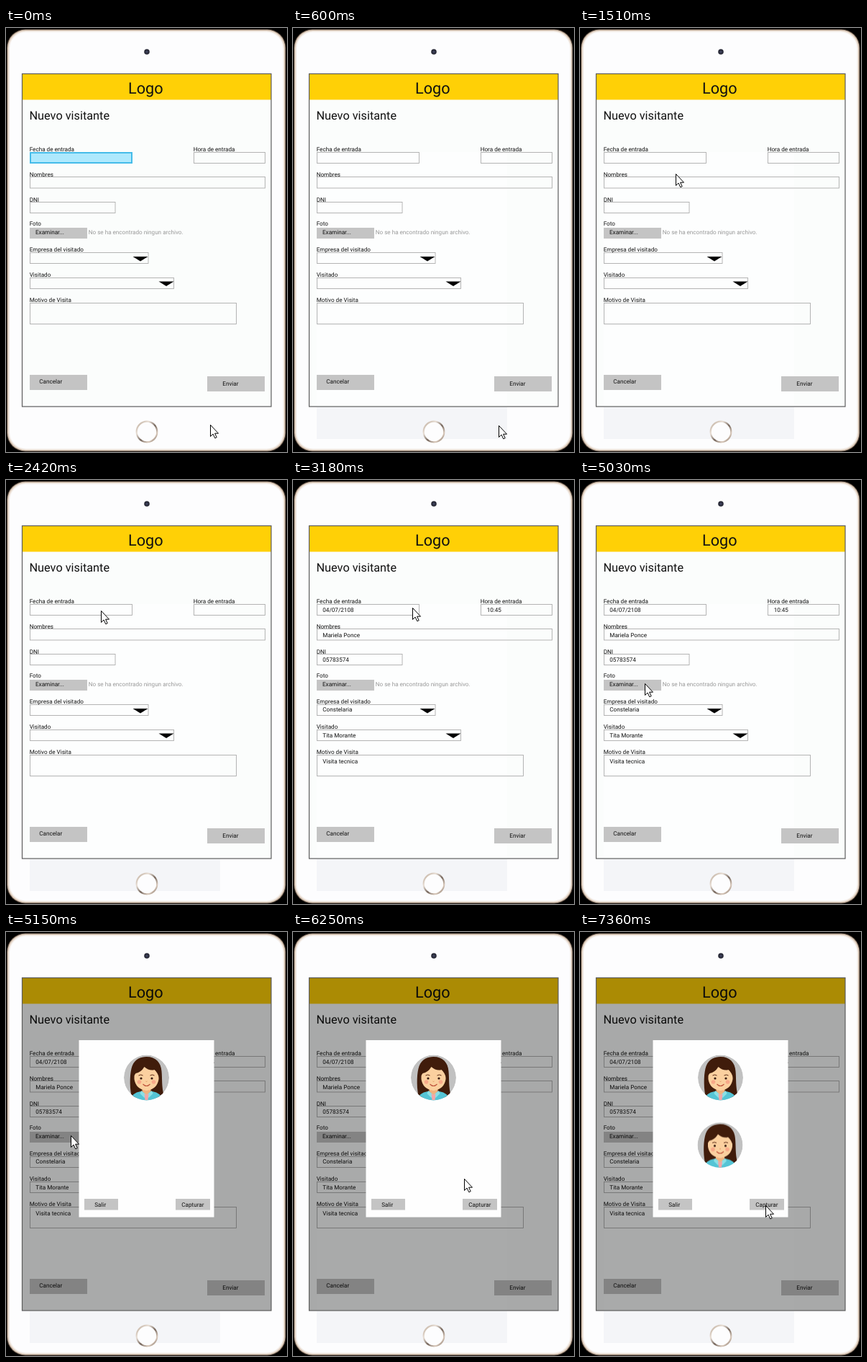
An HTML page that plays this animation: 391x588 px, repeating every 8000 ms.

```html
<!DOCTYPE html>
<html lang="es">
<head>
<meta charset="utf-8">
<title>Nuevo visitante</title>
<style>
  html, body { margin: 0; width: 100%; height: 100%; overflow: hidden; background: #000; }
  svg { display: block; width: 391px; height: 588px; }
  text { font: 8.13px Roboto, sans-serif; fill: #111; text-rendering: geometricPrecision; }
  .logo { font-size: 21.7px; }
  .title { font-size: 16.3px; }
  .hint { fill: #999; }
  .box { fill: none; stroke: #adadad; stroke-width: .9; }
  .button { fill: #c4c4c4; }

  .focus, .trace, .values, .modal, .capture, .cursor { animation: 8s step-end infinite; }
  .focus { animation-name: focus; }
  .trace { animation-name: trace; }
  .values { animation-name: values; }
  .modal { animation-name: modal; }
  .capture { animation-name: capture; }
  .cursor { animation-name: cursor; }

  @keyframes focus {
    0% { opacity: 1; }
    1.5% { opacity: .8; }
    3% { opacity: .6; }
    4.5% { opacity: .4; }
    6% { opacity: .2; }
    7.5%, 100% { opacity: 0; }
  }
  @keyframes trace { 0% { opacity: 0; } 1.5%, 100% { opacity: 1; } }
  @keyframes values { 0% { opacity: 0; } 31.75%, 100% { opacity: 1; } }
  @keyframes modal { 0% { opacity: 0; } 64.375%, 100% { opacity: 1; } }
  @keyframes capture { 0% { opacity: 0; } 92%, 100% { opacity: 1; } }
  @keyframes cursor {
    0% { transform: translate(284px, 550px); }
    1.5% { transform: translate(286px, 551px); }
    10.625% { transform: translate(215px, 390px); }
    12.125% { transform: translate(155px, 264px); }
    15.625% { transform: translate(140px, 222px); }
    17.375% { transform: translate(136px, 210px); }
    18.875% { transform: translate(133px, 202px); }
    20.375% { transform: translate(131px, 195px); }
    22.25% { transform: translate(125px, 187px); }
    23.75% { transform: translate(127px, 183px); }
    25.25% { transform: translate(132px, 181px); }
    35.25% { transform: translate(138px, 180px); }
    36.75% { transform: translate(147px, 179px); }
    38.25% { transform: translate(158px, 178px); }
    39.75% { transform: translate(166px, 177px); }
    41.625% { transform: translate(195px, 228px); }
    43.125% { transform: translate(248px, 335px); }
    44.625% { transform: translate(274px, 393px); }
    49.625% { transform: translate(274px, 404px); }
    51.125% { transform: translate(276px, 411px); }
    52.625% { transform: translate(223px, 388px); }
    54.5% { transform: translate(190px, 360px); }
    56% { transform: translate(145px, 322px); }
    57.5% { transform: translate(102px, 293px); }
    59% { transform: translate(82px, 288px); }
    61% { transform: translate(90px, 282px); }
    67.625% { transform: translate(100px, 283px); }
    69.125% { transform: translate(122px, 288px); }
    70.625% { transform: translate(148px, 296px); }
    72.125% { transform: translate(174px, 305px); }
    73.625% { transform: translate(198px, 314px); }
    75.125% { transform: translate(218px, 321px); }
    76.625% { transform: translate(231px, 326px); }
    78.125% { transform: translate(238px, 342px); }
    79.625% { transform: translate(247px, 360px); }
    81.125% { transform: translate(254px, 375px); }
    82.625% { transform: translate(258px, 384px); }
    92%, 100% { transform: translate(258px, 379px); }
  }
</style>
</head>
<body>
<svg viewBox="0 0 391 588">
  <defs>
    <linearGradient id="ring" x1="0" y1="0" x2="1" y2="1">
      <stop offset="0" stop-color="#b9a796"/>
      <stop offset=".3" stop-color="#e9dfd6"/>
      <stop offset=".55" stop-color="#75665c"/>
      <stop offset=".78" stop-color="#d9c9bb"/>
      <stop offset="1" stop-color="#806f63"/>
    </linearGradient>
    <clipPath id="disc"><circle r="31.5"/></clipPath>
    <g id="avatar" clip-path="url(#disc)">
      <circle r="31.5" fill="#c1c1c1"/>
      <path d="M-21 25C-24 10-23-8-20-16C-16-26-8-29 0-29C13-29 20-21 21-9C22 2 21 12 24 24Q14 30 0 28Q-14 30-21 25Z" fill="#401c0b"/>
      <path d="M-24 33Q-21 21-8 19L0 23L8 19Q21 21 24 33Z" fill="#55c4d5"/>
      <path d="M-6 12H6V19L0 25L-6 19Z" fill="#f0b27e"/>
      <path d="M-7 18L0 24L7 18L9 22L3 28L0 24L-3 28L-9 22Z" fill="#8be0e6"/>
      <path d="M-3 22L0 24L3 22L2 31H-2Z" fill="#f3a6a8"/>
      <path d="M-17-6Q-17-20 0-20Q17-20 17-6V2Q15 16 0 18Q-15 16-17 2Z" fill="#fbd09f"/>
      <path d="M-18 0Q-20-23 0-24Q20-23 18 2Q16-7 11-11Q4-9-3-15Q-8-7-15-6Q-17-4-18 0Z" fill="#401c0b"/>
      <path d="M-11-3Q-8-5-5-3M5-3Q8-5 11-3" fill="none" stroke="#5a2b16"/>
      <circle cx="-7.5" cy="1" r="1.6" fill="#361a10"/>
      <circle cx="7.5" cy="1" r="1.6" fill="#361a10"/>
      <circle cx="-10" cy="6" r="2.8" fill="#f8a989"/>
      <circle cx="10" cy="6" r="2.8" fill="#f8a989"/>
      <path d="M-1 5Q0 6 1 5" fill="none" stroke="#dc965f" stroke-width=".9"/>
      <path d="M-5 9Q0 14 5 9" fill="none" stroke="#bd5039" stroke-width="1.1"/>
    </g>
    <path id="arrow" d="M0 0H21L10.5 6.5Z"/>
  </defs>

  <!-- Tablet -->
  <rect width="391" height="588"/>
  <rect x="1" y="1.5" width="388.5" height="586" rx="26" fill="#514339"/>
  <rect x="2" y="2.5" width="386.5" height="584" rx="25" fill="#d8c6b5"/>
  <rect x="3.5" y="4" width="383.5" height="581" rx="24" fill="#f3ece6"/>
  <rect x="5" y="5.5" width="380.5" height="578" rx="23" fill="#fdfdfe"/>
  <circle cx="196" cy="33" r="3.8" fill="#292a38"/>
  <circle cx="196" cy="33" r="1.6" fill="#414560"/>
  <rect class="trace" x="33" y="526" width="265" height="44" fill="#f4f5f8"/>
  <circle cx="196" cy="560" r="14.3" fill="#fdfdfe" stroke="url(#ring)" stroke-width="2.2"/>

  <!-- Form -->
  <rect x="22.5" y="63.5" width="346.5" height="461.5" fill="#fbfdfc"/>
  <rect class="trace" x="33" y="172" width="265" height="353" fill="#fdfefe"/>
  <rect x="23" y="64" width="346" height="35.5" fill="#ffd006"/>
  <text class="logo" x="170" y="90.5">Logo</text>
  <text class="title" x="32.5" y="126.5">Nuevo visitante</text>

  <g class="box">
    <rect x="33.5" y="172.5" width="142" height="15"/>
    <rect x="261.5" y="172.5" width="99" height="15"/>
    <rect x="33.5" y="206.5" width="327" height="15.5"/>
    <rect x="33.5" y="241.5" width="118.5" height="15"/>
    <rect x="33.5" y="311.5" width="164.5" height="15"/>
    <rect x="33.5" y="346.5" width="200" height="15"/>
    <rect x="33.5" y="381.5" width="287" height="29"/>
  </g>
  <g class="button">
    <rect x="33" y="277" width="80" height="15"/>
    <rect x="33" y="481" width="80" height="21"/>
    <rect x="280" y="483" width="80" height="21"/>
  </g>
  <use href="#arrow" x="176.5" y="317"/>
  <use href="#arrow" x="212.5" y="351.5"/>

  <text x="32.7" y="171">Fecha de entrada</text>
  <text x="260.7" y="171">Hora de entrada</text>
  <text x="32.7" y="205.5">Nombres</text>
  <text x="32.7" y="240.5">DNI</text>
  <text x="32.7" y="274">Foto</text>
  <text x="41" y="286">Examinar...</text>
  <text class="hint" x="114.7" y="286">No se ha encontrado ningun archivo.</text>
  <text x="32.7" y="309.7">Empresa del visitado</text>
  <text x="32.7" y="345">Visitado</text>
  <text x="32.7" y="380">Motivo de Visita</text>
  <text x="46.3" y="493.3">Cancelar</text>
  <text x="301.3" y="495.5">Enviar</text>

  <rect class="focus" x="34" y="173" width="141" height="14" fill="#aee9fd" stroke="#45bce9" stroke-width="2"/>

  <g class="values">
    <text x="41.3" y="183">04/07/2108</text>
    <text x="269.7" y="183">10:45</text>
    <text x="41.3" y="217.7">Mariela Ponce</text>
    <text x="41.3" y="251.5">05783574</text>
    <text x="41.3" y="321.3">Constelaria</text>
    <text x="41.3" y="356.5">Tita Morante</text>
    <text x="41.3" y="393.3">Visita tecnica</text>
  </g>

  <!-- Photo dialog -->
  <g class="modal">
    <rect x="22.5" y="63.5" width="346.5" height="461.5" fill-opacity=".33"/>
    <rect x="101.5" y="150" width="188" height="245.5" fill="#fefefe"/>
    <use href="#avatar" x="195.5" y="202"/>
    <rect class="button" x="109" y="370" width="47" height="15.5"/>
    <rect class="button" x="236" y="370" width="48" height="15.5"/>
    <text x="123.3" y="380.7">Salir</text>
    <text x="244.3" y="380.7">Capturar</text>
  </g>
  <use class="capture" href="#avatar" x="195" y="295.5"/>

  <rect x="22.5" y="63.5" width="346.5" height="461.5" fill="none" stroke="#5c5c5c" stroke-width="1.2"/>

  <path class="cursor" d="M.5 .5V16.5L4 13L6.8 18.8L9.2 17.7L6.6 12.2H11.5Z" fill="#fff" stroke="#000"/>
</svg>
</body>
</html>
```
